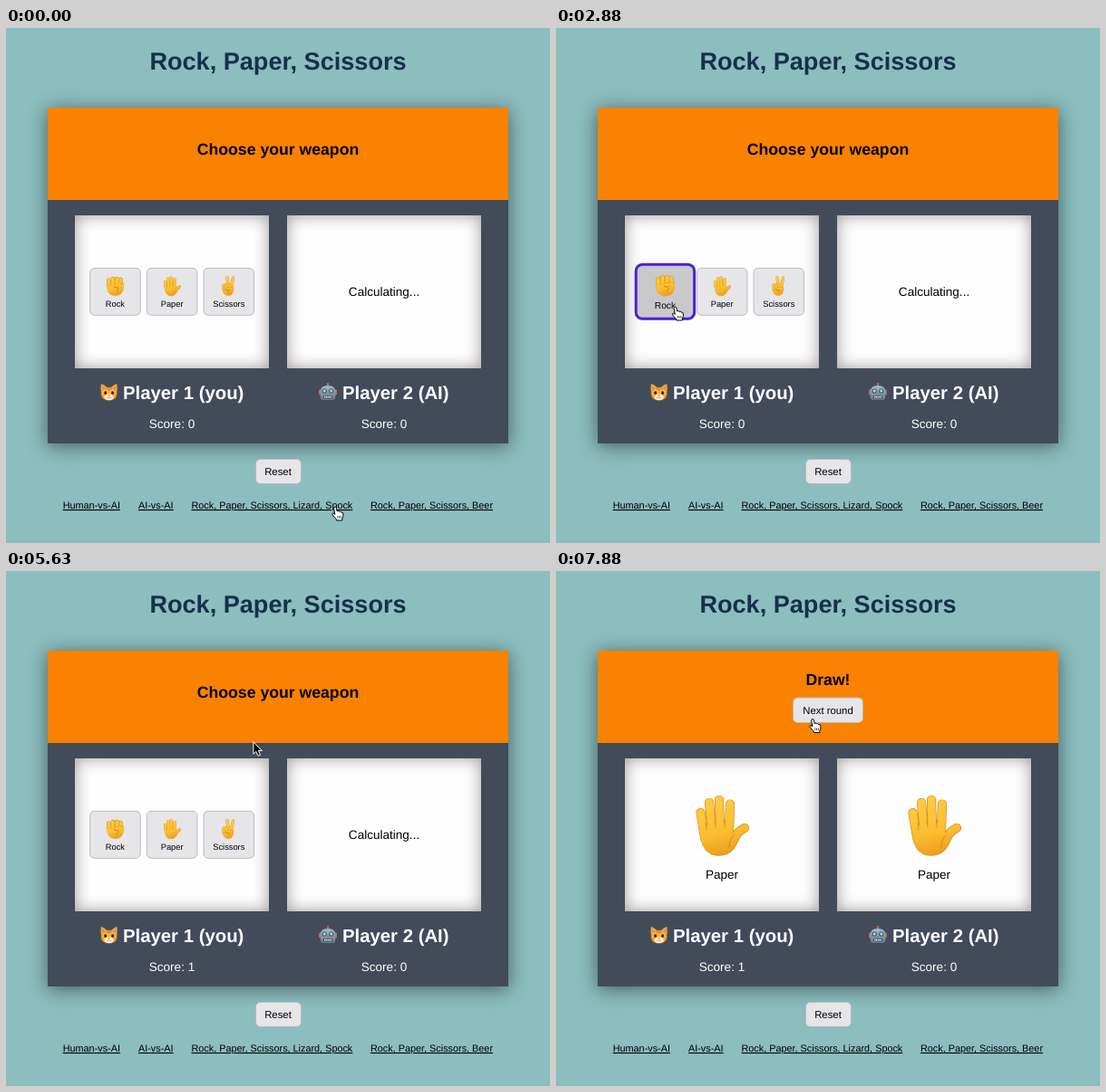
An HTML page for the animation above (8000 ms loop, 600 px wide and 569 px high).

```html
<!DOCTYPE html>
<html lang="en">
<head>
<meta charset="utf-8">
<title>Rock, Paper, Scissors</title>
<style>
  html, body { margin: 0; width: 100%; height: 100%; overflow: hidden; background: #8cbdbf; }
  div, svg { position: absolute; }
  svg { left: 0; top: 0; }
  .card { left: 46px; top: 88px; width: 508px; height: 371px; background: #424b5a;
          box-shadow: 0 3px 20px rgba(0, 0, 0, .5); }
  .banner { width: 508px; height: 102px; background: #fa8200; }
  .panel { top: 119px; width: 214px; height: 169px; background: #fefdff;
           box-shadow: inset 0 0 17px rgba(50, 42, 32, .48); }
  text { font-family: "Liberation Sans", Arial, sans-serif; font-size: 13.56px; text-rendering: geometricPrecision; }
  .mid { text-anchor: middle; }
  .bold { font-weight: bold; }
  .h1 { font-size: 27.1px; fill: #16304c; }
  .h2 { font-size: 20.34px; fill: #fff; }
  .h3 { font-size: 17.65px; }
  .score { fill: #fff; }
  .small { font-size: 11.35px; }
  .tiny { font-size: 9.3px; }
  .link { font-size: 10.85px; text-decoration: underline; }
  .button { fill: #e6e5e8; stroke: #bbb9bc; }
  .hover .button { fill: #c9c8ca; stroke: #c1c0c2; }
  .ring { fill: none; stroke: #4a23cf; stroke-width: 2.7; display: none; }
  .pressed .ring { display: inline; }
  .edge { fill: none; stroke: #d58c18; stroke-linecap: round; stroke-linejoin: round; }
  .skin { fill: none; stroke: url(#skin); stroke-linecap: round; stroke-linejoin: round; }
  .palm { fill: url(#skin); }
  .crease { fill: none; stroke: #b96f0b; stroke-linecap: round; }
</style>
</head>
<body>
<div class="card">
  <div class="banner"></div>
  <div class="panel" style="left:30px"></div>
  <div class="panel" style="left:264px"></div>
</div>

<svg width="600" height="569" viewBox="0 0 600 569">
  <defs>
    <linearGradient id="skin" gradientUnits="userSpaceOnUse" x1="-8" y1="-32" x2="8" y2="34">
      <stop offset="0" stop-color="#ffcb45"/>
      <stop offset=".6" stop-color="#fcbd31"/>
      <stop offset="1" stop-color="#e99a1c"/>
    </linearGradient>
    <linearGradient id="metal" x2="0" y2="1">
      <stop offset="0" stop-color="#a9bcc8"/>
      <stop offset="1" stop-color="#617889"/>
    </linearGradient>

    <path id="fingers" d="M-23.5-14L-20 7M-14-25L-11 4M-3-28L-2 2M9-23.5L8 4M25 3Q17 6 11 19"/>
    <path id="palmShape" d="M-24.5 2C-24 16-21 33-3 33C12 33 16 21 20 11L12 8L12.5 1L2-3Z"/>
    <g id="paper">
      <use href="#fingers" class="edge" stroke-width="10.2"/>
      <use href="#palmShape" class="edge" stroke-width="1.6"/>
      <use href="#fingers" class="skin" stroke-width="8.8"/>
      <use href="#palmShape" class="palm"/>
      <path class="crease" stroke-width=".8" opacity=".7" d="M-17 5L-18-3M-7 2L-8-6M3 2L3-6M8 24Q8 15 13 11"/>
    </g>

    <path id="knuckles" d="M-22-20L-21-7M-8-25L-8-9M6-25L6-9M18.5-22L19-9"/>
    <path id="fistShape" d="M-28-14C-29 8-27 31-2 32C20 33 28 20 28.5 2C29-8 27-15 22-17Z"/>
    <g id="rock">
      <use href="#knuckles" class="edge" stroke-width="13.2"/>
      <use href="#fistShape" class="edge" stroke-width="1.4"/>
      <use href="#fistShape" class="palm"/>
      <use href="#knuckles" class="edge" stroke-width="13.2"/>
      <use href="#knuckles" class="skin" stroke-width="11.2"/>
      <path class="edge" stroke-width="13" d="M21-3Q12-5 2-2"/>
      <path class="skin" stroke-width="11.4" d="M22-2Q12-5 2-2"/>
      <path class="crease" stroke-width="1.8" d="M-3 3Q7 5 12 8Q6 12 6 19"/>
    </g>

    <path id="vee" d="M-5.5-28L-1 2M14.5-28L8 4"/>
    <path id="veePalm" d="M-21 2C-23 18-17 32-2 32C13 32 16 20 15 4L8-3L-4-2Z"/>
    <path id="curled" d="M-17.5-3L-16.5 10M-9-4L-7 10"/>
    <g id="scissors">
      <use href="#vee" class="edge" stroke-width="10.2"/>
      <use href="#veePalm" class="edge" stroke-width="1.5"/>
      <use href="#vee" class="skin" stroke-width="8.8"/>
      <use href="#veePalm" class="palm"/>
      <use href="#curled" class="edge" stroke-width="9.8"/>
      <use href="#curled" class="skin" stroke-width="8.2"/>
      <path class="edge" stroke-width="9.6" d="M11 9Q3 5-5 9"/>
      <path class="skin" stroke-width="8" d="M11 10Q3 5-5 9"/>
      <path class="crease" stroke-width="1.5" d="M-9 13Q-2 12 2 14Q-2 18-1 23"/>
    </g>

    <g id="cat">
      <path d="M-8.5-9.5Q-5-8-2.5-5.5H2.5Q5-8 8.5-9.5Q9.5-4 8.5 0Q10 8 0 9Q-10 8-8.5 0Q-9.5-4-8.5-9.5Z" fill="#f9b13d" stroke="#c88121" stroke-width=".5"/>
      <path d="M-7.5-7.5L-4-4.5L-7.5-2ZM7.5-7.5L4-4.5L7.5-2Z" fill="#e5857b"/>
      <path d="M0-5.5V-2M-2.2-5V-3M2.2-5V-3" stroke="#b96d18"/>
      <ellipse cy="5.2" rx="5" ry="3.3" fill="#fff1d2"/>
      <ellipse cx="-4" cy=".5" rx="1.5" ry="1.9" fill="#33251a"/>
      <ellipse cx="4" cy=".5" rx="1.5" ry="1.9" fill="#33251a"/>
      <path d="M-1.4 3H1.4L0 4.6Z" fill="#d9646b"/>
      <path d="M-2.5 5.5Q-1 7 0 5.2Q1 7 2.5 5.5" fill="none" stroke="#8c5a22" stroke-width=".6"/>
      <path d="M-9.5 3L-6 4M-9 6.5L-6 5.8M9.5 3L6 4M9 6.5L6 5.8" stroke="#7d5a33" stroke-width=".5"/>
    </g>

    <g id="robot">
      <path d="M0-6V-9" stroke="#8295a1" stroke-width="1.4"/>
      <circle cy="-8.8" r="1.3" fill="#d95748"/>
      <rect x="-10" y="-2.5" width="3" height="6" rx="1" fill="#d2654f"/>
      <rect x="7" y="-2.5" width="3" height="6" rx="1" fill="#d2654f"/>
      <path d="M-8.3 0Q-8.3-7 0-7Q8.3-7 8.3 0V6Q8 9 5 9H-5Q-8 9-8.3 6Z" fill="url(#metal)"/>
      <circle cx="-3.8" cy="-1" r="2.6" fill="#34495a"/>
      <circle cx="3.8" cy="-1" r="2.6" fill="#34495a"/>
      <circle cx="-3.8" cy="-1" r="1.7" fill="#7be5ee"/>
      <circle cx="3.8" cy="-1" r="1.7" fill="#7be5ee"/>
      <path d="M0 1L1.2 3H-1.2Z" fill="#d95748"/>
      <rect x="-5" y="4" width="10" height="3.2" rx="1" fill="#34495a"/>
      <path d="M-4 5.6H4" stroke="#dce7ec" stroke-width="1.7" stroke-dasharray="1.3 .4"/>
    </g>
  </defs>

  <text class="mid bold h1" x="300" y="46">Rock, Paper, Scissors</text>

  <use href="#cat" x="113.6" y="402.6"/>
  <text class="bold h2" x="129" y="410">Player 1 (you)</text>
  <use href="#robot" x="355" y="402"/>
  <text class="bold h2" x="371" y="410">Player 2 (AI)</text>
  <text class="mid score" x="183" y="442" id="score">Score: 0</text>
  <text class="mid score" x="417" y="442">Score: 0</text>

  <rect class="button" x="275.5" y="476.5" width="50" height="27" rx="5"/>
  <text class="mid small" x="300" y="494">Reset</text>
  <text class="link" x="62.7" y="531">Human-vs-AI</text>
  <text class="link" x="146" y="531">AI-vs-AI</text>
  <text class="link" x="204.5" y="531">Rock, Paper, Scissors, Lizard, Spock</text>
  <text class="link" x="402" y="531">Rock, Paper, Scissors, Beer</text>

  <g id="choose">
    <text class="mid bold h3" x="300" y="139.7">Choose your weapon</text>
    <text class="mid" x="417" y="295.8">Calculating...</text>
    <g id="weapons"></g>
  </g>

  <g id="result">
    <g id="win">
      <use href="#cat" transform="translate(214 120) scale(.87)"/>
      <text class="bold h3" x="227" y="126">Player 1 (you) Wins!</text>
    </g>
    <text class="mid bold h3" x="300" y="126" id="draw">Draw!</text>
    <rect class="button" x="261.5" y="140" width="77" height="27.5" rx="5"/>
    <text class="mid small" x="300" y="157.8">Next round</text>
    <use id="pick1" x="183" y="281"/>
    <use id="pick2" x="417" y="281"/>
    <text class="mid" x="183" y="340" id="name1"></text>
    <text class="mid" x="417" y="340" id="name2"></text>
  </g>

  <path id="arrow" d="M0 0V13.2L3 10.4L5.2 15.4L7.6 14.3L5.4 9.5H9.4Z" fill="#000" stroke="#fff" stroke-width="1"/>
  <g id="pointer" stroke="#000" stroke-width="1" stroke-linejoin="round">
    <path d="M-1.4 1.4Q-1.2 0 0 0Q1.1 0 1.4 1.5L2.2 5Q3.6 4 4.5 5.3Q5.8 4.6 6.6 6Q8.6 5.5 8.9 8Q9.2 11 7.8 13V15H1.4V13.7Q-.8 11.8-2.8 9Q-3.6 7.4-2.3 7.1Q-1.2 7-.2 8.5Z" fill="#fff"/>
    <path d="M2.8 10V12.6M4.6 10V12.6M6.4 10V12.6" stroke-width=".7"/>
  </g>
</svg>

<script>
const LOOP = 8000, STEP = 125;
const $ = id => document.getElementById(id);
const show = (id, on) => { $(id).style.display = on ? "inline" : "none"; };

const weapons = ["Rock", "Paper", "Scissors"].map((name, i) => ({ name, x: 120.4 + i * 62.7, y: 291.3 }));

$("weapons").innerHTML = weapons.map(w => `
  <g id="btn${w.name}">
    <rect class="button" x="-27.8" y="-26" width="55.6" height="52" rx="5"/>
    <rect class="ring" x="-29.3" y="-27.3" width="58.6" height="54.6" rx="6.5"/>
    <use href="#${w.name.toLowerCase()}" transform="translate(0 -6.2) scale(.325)"/>
    <text class="mid tiny" y="16.8">${w.name}</text>
  </g>`).join("");

// Cursor moves: start, end, control point, destination
const start = [363, 529];
const moves = [
  [500, 875, 362, 541, 345, 541],
  [875, 2500, 220, 372, 131.5, 308],
  [3625, 4500, 210, 215, 312.5, 153.5],
  [5250, 6250, 250, 205, 187, 285.5],
  [7250, 7875, 225, 200, 283, 163.5]
];

function cursorAt(t) {
  let [x, y] = start;
  for (const [t0, t1, cx, cy, ex, ey] of moves) {
    if (t <= t0) break;
    const u = Math.min(1, (t - t0) / (t1 - t0));
    const s = u * u * (3 - 2 * u);
    const mix = (a, c, b) => (1 - s) ** 2 * a + 2 * s * (1 - s) * c + s * s * b;
    x = mix(x, cx, ex);
    y = mix(y, cy, ey);
  }
  return [x, y];
}

const links = [[63, 126], [146, 185], [204.5, 382.5], [402, 538]];

function setPicks(a, b) {
  [a, b].forEach((name, i) => {
    $("pick" + (i + 1)).setAttribute("href", "#" + name.toLowerCase());
    $("name" + (i + 1)).textContent = name;
  });
}

function render(t) {
  const [x, y] = cursorAt(t);
  const won = t >= 3000 && t < 5250, drawn = t >= 6750;
  const result = won || drawn;
  const pressed = (t >= 2750 && t < 3000) || (t >= 6500 && t < 6750);

  show("choose", !result);
  show("result", result);
  show("win", won);
  show("draw", drawn);
  setPicks(drawn ? "Paper" : "Rock", drawn ? "Paper" : "Scissors");
  $("score").textContent = "Score: " + (t >= 3000 ? 1 : 0);

  let hand = y > 520 && y < 535 && links.some(([a, b]) => x > a && x < b);
  if (result) hand = hand || (x > 261 && x < 339 && y > 139 && y < 168);
  for (const w of weapons) {
    const over = !result && Math.abs(x - w.x) < 28 && Math.abs(y - w.y) < 26;
    const g = $("btn" + w.name);
    g.setAttribute("transform", `translate(${w.x} ${w.y}) scale(${over ? 1.1 : 1})`);
    g.classList.toggle("hover", over);
    g.classList.toggle("pressed", over && pressed);
    hand = hand || over;
  }

  show("pointer", hand);
  show("arrow", !hand);
  $(hand ? "pointer" : "arrow").setAttribute("transform", `translate(${x} ${y})`);
}

const begin = performance.now();
function tick() {
  const t = (performance.now() - begin) % LOOP;
  render(Math.floor(t / STEP) * STEP);
  requestAnimationFrame(tick);
}
tick();
</script>
</body>
</html>
```
